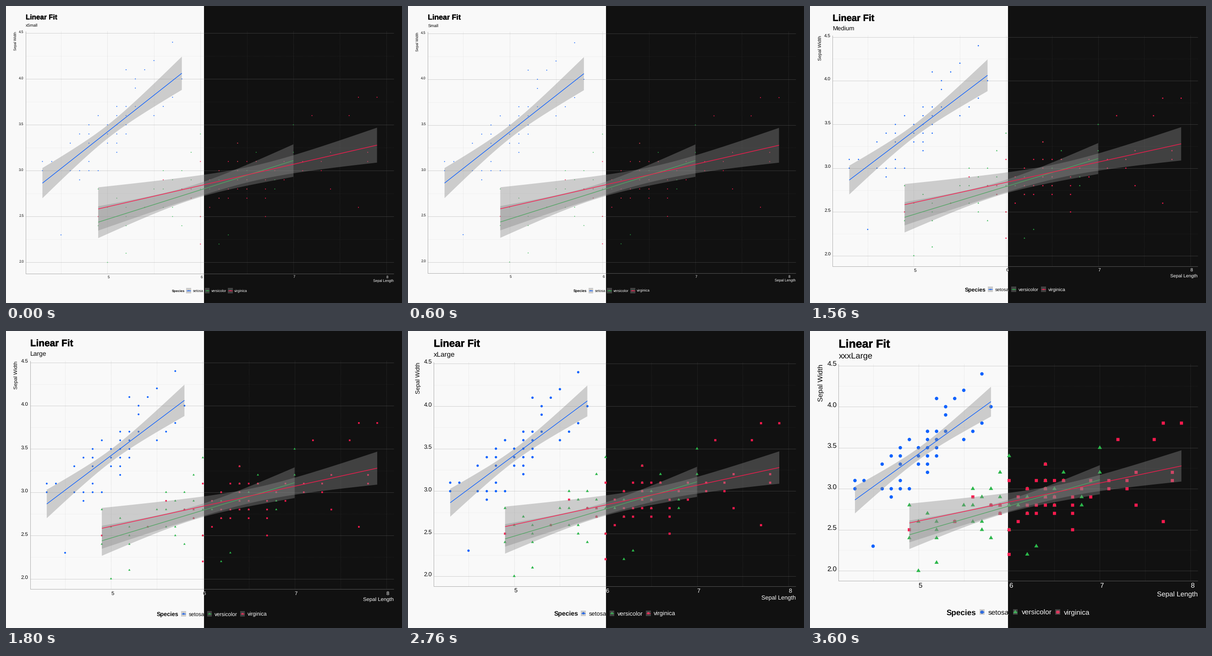
Animation, 864 px wide and 648 px high, one loop 4.2 s. Source, as a matplotlib script:

```python
from itertools import count

import numpy as np
import matplotlib.pyplot as plt
from matplotlib.animation import ArtistAnimation
from matplotlib.collections import PolyCollection
from matplotlib.lines import Line2D
from matplotlib.patches import Polygon, Rectangle
from matplotlib.patheffects import withStroke
from matplotlib.text import Text
from matplotlib.textpath import TextPath

W, H, DPI = 864, 648, 72  # at 72 dpi one point equals one pixel
RIGHT = 846
CAP = 0.72
KEY = 10.6
FONT = "Liberation Sans"
GREY = "#808080"
BAND = dict(color="#8a8a8a", alpha=0.4, linewidth=0)

plt.rcParams["font.family"] = FONT
plt.rcParams["text.hinting"] = "none"

angles = np.linspace(0, 2 * np.pi, 32, endpoint=False)
CIRCLE = 1.1 * np.column_stack([np.cos(angles), np.sin(angles)])
TRIANGLE = np.array([(0, -1.554), (1.347, 0.777), (-1.347, 0.777)])
SQUARE = np.array([(-1, -1), (1, -1), (1, 1), (-1, 1)])


class Species:
    """A linear trend with scattered samples and a few outlying points."""

    def __init__(self, name, color, shape, span, trend, spread, outliers, seed):
        self.name, self.color, self.shape, self.span = name, color, shape, span
        self.intercept, self.slope = trend
        self.mean, self.dev, self.err = spread
        rng = np.random.default_rng(seed)
        x = self.mean + self.dev * rng.triangular(-2.2, 0, 2.2, 44)
        y = self.line(x) + self.err * rng.triangular(-1.9, 0, 1.9, 44)
        samples = np.column_stack([x, y]).round(1)
        self.points = np.unique(np.vstack([samples, outliers]), axis=0)

    def line(self, x):
        return self.intercept + self.slope * x

    def margin(self, x):
        """Half-width of the 95 % confidence band for 50 samples."""
        offset = (x - self.mean) ** 2 / (49 * self.dev ** 2)
        return 2.0106 * self.err * np.sqrt(1 / 50 + offset)


SPECIES = [
    Species("setosa", "#0f62fe", CIRCLE, (4.3, 5.8), (-0.5694, 0.7985),
            (5.006, 0.3525, 0.2565),
            [(4.5, 2.3), (4.3, 3.0), (5.2, 4.1), (5.5, 4.2), (5.7, 4.4),
             (5.8, 4.0), (5.7, 3.8)], seed=3),
    Species("versicolor", "#2bb74a", TRIANGLE, (4.9, 7.0), (0.8721, 0.3197),
            (5.936, 0.5162, 0.2697),
            [(5.0, 2.0), (4.9, 2.4), (6.2, 2.2), (6.3, 2.3), (5.9, 3.2),
             (6.0, 3.4), (6.8, 2.8), (7.0, 3.2)], seed=5),
    Species("virginica", "#fa1a4e", SQUARE, (4.9, 7.9), (1.4463, 0.2319),
            (6.588, 0.6359, 0.2898),
            [(4.9, 2.5), (6.0, 2.2), (6.7, 2.5), (7.2, 3.6), (7.4, 2.8),
             (7.7, 2.6), (7.7, 3.8), (7.9, 3.8)], seed=8),
]

# Type sizes: title, subtitle, body. The layout follows from them.
SIZES = {
    "xSmall": (15.3, 8.9, 7.6),
    "Small": (16, 9.2, 7.7),
    "Medium": (20.2, 13.4, 10.1),
    "Large": (20.8, 13.9, 11.4),
    "xLarge": (22.4, 15.2, 12.7),
    "xxLarge": (23.8, 16.4, 13.9),
    "xxxLarge": (24.9, 18.2, 15.1),
}


def text_width(s, px, weight="normal"):
    path = TextPath((0, 0), s, size=px, prop=dict(family=FONT, weight=weight))
    return path.get_extents().x1


def draw_plot(ax, ink, label):
    title_px, sub_px, body = SIZES[label]
    left = 23.2 + 2.6 * body
    top = 55 + 1.78 * (title_px - 15.3)
    bottom = 583.5 - 2.6 * (body - 7.6) - 2.08 * (sub_px - 8.9)
    radius = max(0.9, 0.44 * body - 3.24)
    artists, order = [], count(1)

    def add(artist):
        artist.set_zorder(next(order))
        artists.append(ax.add_artist(artist))

    def text(x, y, s, px, **kw):
        add(Text(x, y, s, fontsize=px, color=ink, clip_on=True,
                 verticalalignment="baseline", **kw))

    def line(xs, ys, color=GREY, width=0.8, **kw):
        add(Line2D(xs, ys, color=color, linewidth=width,
                   solid_capstyle="butt", dash_capstyle="butt", **kw))

    def marks(kind, centres):
        add(PolyCollection([c + radius * kind.shape for c in centres],
                           facecolor=kind.color, linewidth=0, snap=False))

    def px(x):
        return left + (x - 4.12) / 3.96 * (RIGHT - left)

    def py(y):
        return bottom - (y - 1.88) / 2.64 * (bottom - top)

    # grid and axis lines
    across, down = (left, RIGHT), (top, bottom)
    dots = dict(linestyle=(0, (1, 1.5)))
    for y in np.arange(2.25, 4.5, 0.5):
        line(across, [py(y)] * 2, alpha=0.2, **dots)
    for x in np.arange(4.5, 8, 1):
        line([px(x)] * 2, down, alpha=0.28, **dots)
    for y in np.arange(2, 4.6, 0.5):
        line(across, [py(y)] * 2, alpha=0.4)
    for x in range(5, 9):
        line([px(x)] * 2, down, alpha=0.42, **dots)
    line(across, [bottom] * 2, alpha=0.75)
    line([left] * 2, down, alpha=0.75)

    # data
    for kind in SPECIES:
        marks(kind, np.column_stack([px(kind.points[:, 0]),
                                     py(kind.points[:, 1])]))
    for kind in SPECIES:
        x = np.linspace(*kind.span, 80)
        y, half = kind.line(x), kind.margin(x)
        ys = np.concatenate([py(y + half), py(y - half)[::-1]])
        xs = np.concatenate([px(x), px(x)[::-1]])
        add(Polygon(np.column_stack([xs, ys]), **BAND))
        line(px(x), py(y), kind.color, 1.35)

    # titles and tick labels
    text(left, 18.2 + CAP * title_px, "Linear Fit", title_px,
         fontweight="bold",
         path_effects=[withStroke(linewidth=0.025 * title_px, foreground=ink)])
    text(left, top - 8.4 - 0.19 * sub_px, label, sub_px)
    for y in np.arange(2, 4.6, 0.5):
        text(left - 4.2, py(y) + 0.4, f"{y:.1f}", body,
             horizontalalignment="right")
    for x in range(5, 9):
        text(px(x), bottom + 4.5 + CAP * body, str(x), body)
    text(RIGHT, bottom + 3.6 + 2 * body, "Sepal Length", body,
         horizontalalignment="right")
    text(17.5 + CAP * body, top + 0.5, "Sepal Width", body, rotation=90,
         rotation_mode="anchor", horizontalalignment="right")

    # legend, centred below the panel
    row, gap = 628.5 - body, 0.65 * body - 1.5
    head_px, item_px = 1.04 * sub_px - 1.8, 1.02 * body
    head = text_width("Species", head_px, "bold")
    items = [text_width(kind.name, item_px) for kind in SPECIES]
    x = (left + RIGHT - head - sum(items) - 3 * KEY - 6 * gap) / 2
    text(x, row + CAP / 2 * head_px + 0.4, "Species", head_px,
         fontweight="bold")
    x += head + gap
    for kind, width in zip(SPECIES, items):
        marks(kind, [np.array([x + KEY / 2, row])])
        add(Rectangle((x, row - 6), KEY, 12, **BAND))
        line((x + 1, x + KEY - 1), (row, row), kind.color, 1.35)
        x += KEY + gap
        text(x, row + CAP / 2 * item_px + 0.2, kind.name, item_px)
        x += width + gap
    return artists


def half_stage(x0, paper):
    ax = fig.add_axes([x0 / W, 0, 0.5, 1], facecolor=paper)
    ax.set(xlim=(x0, x0 + W / 2), ylim=(H, 0), xticks=[], yticks=[])
    ax.spines[:].set_visible(False)
    return ax


fig = plt.figure(figsize=(W / DPI, H / DPI), dpi=DPI)
light = half_stage(0, "#f9f9f9")
dark = half_stage(W / 2, "#111111")

steps = [draw_plot(light, "#050505", label) + draw_plot(dark, "#f9f9f9", label)
         for label in SIZES]
anim = ArtistAnimation(fig, steps, interval=600, repeat=True, repeat_delay=0)
plt.show()
```
